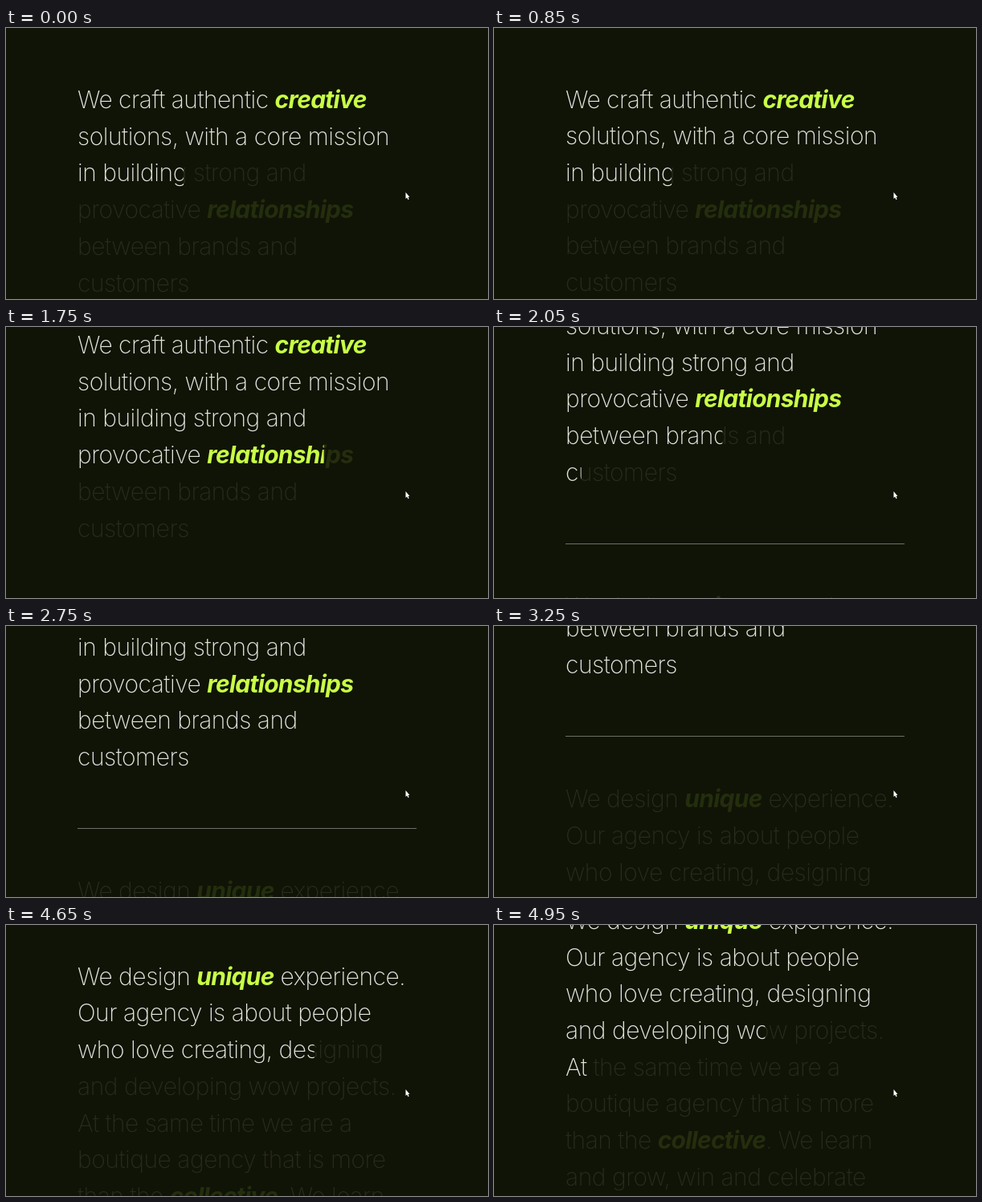
Animation, 600 px wide and 338 px high, one loop 5 s. Source, as an HTML page with a canvas:

```html
<!DOCTYPE html>
<html lang="en">
<head>
<meta charset="utf-8">
<style>
html, body { margin: 0; height: 100%; overflow: hidden; background: #101406; }
canvas { display: block; }
</style>
</head>
<body>
<canvas id="stage" width="600" height="338"></canvas>
<script>
const ctx = document.getElementById('stage').getContext('2d');
const LOOP = 5000, LEFT = 89, WIDTH = 422, PITCH = 45.7, TRIGGER = 205.7, LAG = 160;

// Accent words stand between asterisks.
const blocks = [
  { top: 100, rows: ['We craft authentic *creative*', 'solutions, with a core mission',
    'in building strong and', 'provocative *relationships*', 'between brands and', 'customers'] },
  { top: 495.5, rows: ['We design *unique* experience.', 'Our agency is about people',
    'who love creating, designing', 'and developing wow projects.', 'At the same time we are a',
    'boutique agency that is more', 'than the *collective*. We learn', 'and grow, win and celebrate'] }
];
const lines = blocks.flatMap(({ top, rows }) =>
  rows.map((text, i) => ({ parts: text.split('*'), y: top + i * PITCH })));

// Each flick of the wheel scrolls along an S-curve.
const flicks = [
  { mid: 1163, spread: 62, distance: 66 },
  { mid: 1977, spread: 50, distance: 87 },
  { mid: 3040, spread: 65, distance: 121 },
  { mid: 3890, spread: 40, distance: 134 },
  { mid: 4890, spread: 108, distance: 130 }
];
const scrollAt = t => flicks.reduce((sum, { mid, spread, distance }) =>
  sum + distance / (1 + Math.exp((mid - t) / spread)), 0);

const goal = (line, scroll) => Math.min(1, Math.max(0, (TRIGGER - line.y + scroll) / PITCH));

// Each line's reveal trails its scroll progress.
function revealsAt(t) {
  const shown = lines.map(line => goal(line, 0));
  const step = 10, ease = 1 - Math.exp(-step / LAG);
  for (let time = 850; time < t; time += step) {
    const scroll = scrollAt(time + step);
    lines.forEach((line, i) => shown[i] += (goal(line, scroll) - shown[i]) * ease);
  }
  return shown;
}

function drawText(parts, y) {
  let x = LEFT;
  parts.forEach((part, i) => {
    const accent = i % 2;
    ctx.font = `${accent ? 'italic 700' : '200'} 30px Inter, sans-serif`;
    ctx.letterSpacing = accent ? '-0.75px' : '-0.5px';
    ctx.fillStyle = accent ? '#c8ff46' : '#e4e5df';
    ctx.fillText(part, x, y);
    x += ctx.measureText(part).width;
  });
}

function drawPart(line, y, from, to, alpha) {
  ctx.save();
  ctx.beginPath();
  ctx.rect(from, y - 40, to - from, 60);
  ctx.clip();
  ctx.globalAlpha = alpha;
  drawText(line.parts, y);
  ctx.restore();
}

function frame(now) {
  const t = Math.floor(now % LOOP / 50) * 50;
  const scroll = scrollAt(t), shown = revealsAt(t);
  ctx.fillStyle = '#101406';
  ctx.fillRect(0, 0, 600, 338);
  lines.forEach((line, i) => {
    const y = line.y - scroll, edge = LEFT + WIDTH * shown[i];
    drawPart(line, y, edge, 600, 0.11);
    if (shown[i] > 0) drawPart(line, y, 0, edge, 1);
  });
  ctx.fillStyle = '#6d7066';
  ctx.fillRect(LEFT, Math.round(406.3 - scroll), WIDTH, 1);
  ctx.fillStyle = '#fff';
  ctx.fill(new Path2D('M497.5 205v8l1.7-1.5 1.3 2.7 1.2-.6-1.2-2.6h2z'));
  requestAnimationFrame(frame);
}
requestAnimationFrame(frame);
</script>
</body>
</html>
```
